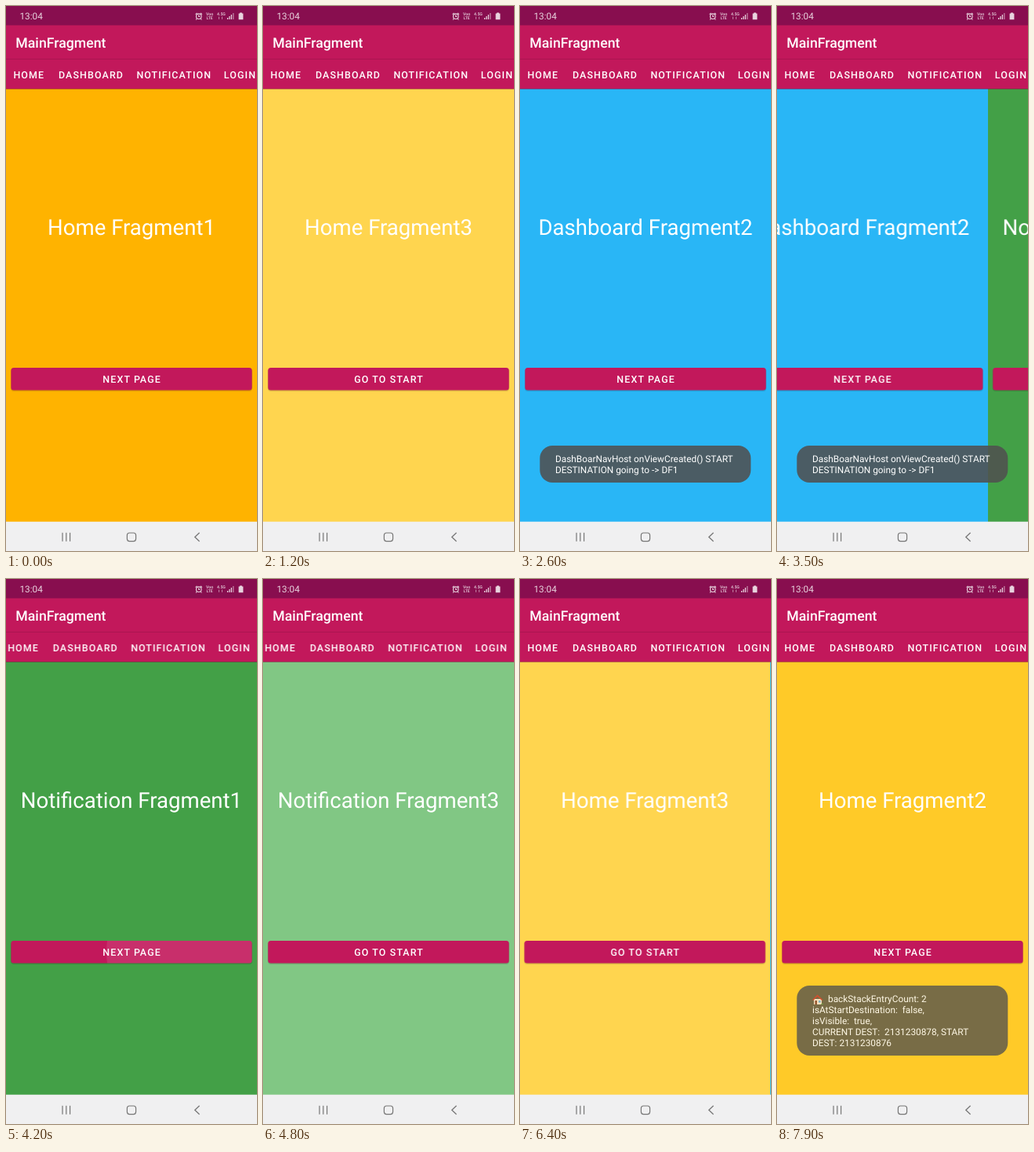
An HTML page for the animation above (8 s loop, 320 by 693 pixels).

```html
<!DOCTYPE html>
<html lang="en">
<head>
<meta charset="utf-8">
<title>Tabs with nested navigation</title>
<style>
html, body { margin: 0; width: 100%; height: 100%; overflow: hidden; background: #f0f0f1; }
svg { display: block; width: 320px; height: 693px; font-family: Roboto, sans-serif; text-rendering: geometricPrecision; }
text { fill: #fff; white-space: pre; }
.caps { font-size: 12.44px; font-weight: 500; letter-spacing: 1.11px; }
.head { font-size: 27.6px; text-anchor: middle; }
.label { text-anchor: middle; }
.toast { font-size: 11.85px; }
.tiny { font-size: 5.2px; font-weight: 500; }
.status text { fill: #e8d3de; }
</style>
</head>
<body>
<svg viewBox="0 0 320 693">
  <defs>
    <clipPath id="face"><rect x="6.4" y="460" width="307.2" height="28.4" rx="3.5"/></clipPath>
  </defs>
  <g id="strip"></g>
  <g clip-path="url(#face)"><circle id="ripple" cx="225" cy="474" r="97" fill="#fff" fill-opacity=".1"/></g>

  <rect width="320" height="105.5" fill="#c2185b"/>
  <rect y="67" width="320" height="1" fill="#000" opacity=".12"/>
  <rect y="105" width="320" height="1" fill="#000" opacity=".18"/>
  <text x="12.3" y="53.2" font-size="17.7" font-weight="500">MainFragment</text>
  <g id="tabs" class="caps"></g>

  <g class="status">
    <rect width="320" height="24.5" fill="#880e4f"/>
    <text x="17.4" y="17.3" font-size="11.8">13:04</text>
    <g fill="none" stroke="#e8d3de" stroke-width="1.1">
      <circle cx="245.8" cy="13.2" r="3.3"/>
      <path d="M245.8 11.2v2.2h1.5M241.6 10.6l2-1.8M250 10.6l-2-1.8M243.2 16.3l-1 1.2M248.4 16.3l1 1.2"/>
    </g>
    <text class="tiny" x="255" y="11.9">Voᴏ</text>
    <text class="tiny" x="255.4" y="17.2">LTE</text>
    <text class="tiny" x="269" y="11.9">4.5G</text>
    <path d="M271.5 13.6v3.2M275.5 13.6v3.2" stroke="#e8d3de" opacity=".6"/>
    <path d="M282.6 17v-2M285 17v-4M287.4 17v-6" stroke="#e8d3de" stroke-width="1.3"/>
    <path d="M289.8 17v-8" stroke="#e8d3de" stroke-width="1.3" opacity=".6"/>
    <path d="M298 8.4h3v1h1.4v7.8h-5.8v-7.8h1.4z" fill="#e8d3de"/>
  </g>

  <rect y="655.7" width="320" height="37.3" fill="#f0f0f1"/>
  <ellipse id="press" cx="243.5" cy="675" rx="30" ry="18" fill="#000" fill-opacity=".08"/>
  <g fill="none" stroke="#777" stroke-width="1.2">
    <path d="M72 669.8v11M76.8 669.8v11M81.6 669.8v11"/>
    <rect x="154.4" y="670" width="11.2" height="10.6" rx="3"/>
    <path d="M246.6 669.8l-5.8 5.5 5.8 5.5" stroke-width="1.3"/>
  </g>
  <g id="toasts" class="toast"></g>
</svg>
<script>
const LOOP = 8000, W = 320;
const $ = id => document.getElementById(id);

function add(parent, tag, attrs = {}, text = '') {
  const el = document.createElementNS('http://www.w3.org/2000/svg', tag);
  for (const k in attrs) el.setAttribute(k, attrs[k]);
  el.textContent = text;
  return parent.appendChild(el);
}

// Loops a table of [ms, value] as held steps.
function play(el, prop, steps) {
  const frames = steps.map(([ms, v]) => ({ offset: ms / LOOP, [prop]: v, easing: 'step-end' }));
  frames.push({ offset: 1, [prop]: steps[steps.length - 1][1] });
  el.animate(frames, { duration: LOOP, iterations: Infinity });
}

const every100 = (start, list) => list.map((v, i) => [start + i * 100, v]);
const shift = x => `translateX(${x}px)`;

// Each page holds three screens; `shown` lists when each screen takes over.
const pages = [
  { name: 'Home', fills: ['#ffb300', '#ffca28', '#ffd54f'], shown: [[0, 0], [600, 1], [1200, 2], [7500, 1]] },
  { name: 'Dashboard', fills: ['#039be5', '#29b6f6', '#4fc3f7'], shown: [[0, 0], [2600, 1]] },
  { name: 'Notification', fills: ['#43a047', '#66bb6a', '#81c784'], shown: [[0, 0], [4300, 1], [4800, 2]] }
];

pages.forEach(({ name, fills, shown }, p) => {
  const page = add($('strip'), 'g', { transform: `translate(${p * W} 0)` });
  fills.forEach((fill, i) => {
    const g = add(page, 'g');
    add(g, 'rect', { y: 105, width: W, height: 551, fill });
    add(g, 'text', { class: 'head', x: 160, y: 291.4 }, `${name} Fragment${i + 1}`);
    add(g, 'rect', { x: 6, y: 461, width: 308, height: 29, rx: 4, fill: '#000', opacity: .14 });
    add(g, 'rect', { x: 6.4, y: 460, width: 307.2, height: 28.4, rx: 3.5, fill: '#c2185b' });
    add(g, 'text', { class: 'caps label', x: 160.6, y: 478.8 }, i < 2 ? 'NEXT PAGE' : 'GO TO START');
    play(g, 'opacity', shown.map(([ms, n]) => [ms, +(n === i)]));
  });
});

[['HOME', 9.4], ['DASHBOARD', 67], ['NOTIFICATION', 166.4], ['LOGIN', 277.8]]
  .forEach(([s, x]) => add($('tabs'), 'text', { x, y: 91.9 }, s));

// Pager position in pages.
const pos = [
  [0, 0],
  ...every100(1700, [.04, .2, .5, .8, .94, .99, 1]),
  ...every100(3400, [1.04, 1.16, 1.42, 1.72, 1.9, 1.97, 1.995, 2]),
  ...every100(5200, [1.9, 1.5, 1.15, 1.015, 1]),
  ...every100(6100, [.88, .42, .07, .0025, 0])
];
const tabShift = v => -Math.min(7.3, Math.max(0, 105 * (v - 1) - 52));
play($('strip'), 'transform', pos.map(([ms, v]) => [ms, shift(-v * W)]));
play($('tabs'), 'transform', pos.map(([ms, v]) => [ms, shift(tabShift(v))]));

play($('ripple'), 'opacity', [[0, 0],
  ...[[500, 600], [1000, 1200], [2500, 2600], [4200, 4300], [4700, 4800]]
    .flatMap(([on, off]) => [[on, 1], [off, 0]])]);
play($('ripple'), 'r', [[0, '97px'], [1000, '45px'], [1100, '97px']]);
play($('press'), 'opacity', [[0, 0], ...every100(7400, [1, .8, .4, .15, 0])]);

function toast(lines, steps) {
  const g = add($('toasts'), 'g'), h = 19 + lines.length * 14, top = 606 - h;
  add(g, 'rect', { x: 25.3, y: top, width: 269, height: h, rx: 16, fill: '#505050', 'fill-opacity': .88 });
  lines.forEach(([s, x = 45], i) => add(g, 'text', { x, y: top + 21.4 + i * 14 }, s));
  play(g, 'opacity', [[0, 0], ...steps]);
  return g;
}

toast([['DashBoarNavHost onViewCreated() START'], ['DESTINATION going to -> DF1']],
  [...every100(2000, [.3, .6, .88, 1]), ...every100(3800, [.75, .4, .12, 0])]);

const info = toast([
  ['backStackEntryCount: 2', 65],
  ['isAtStartDestination:  false,'],
  ['isVisible:  true,'],
  ['CURRENT DEST:  2131230878, START'],
  ['DEST: 2131230876']
], every100(7600, [.15, .4, .67, .88]));

// Small house at the start of the first line.
[['M47 534h10v7H47z', '#f3e3d0'], ['M45 535l6.5-6.5 7 6.5-1.2 1-5.8-5-5.3 5z', '#c8402f'],
 ['M48.4 536h2.6v5h-2.6z', '#8a4b32'], ['M53 536h2.6v2.6H53z', '#6fb3d8'], ['M56 541a1.8 1.8 0 0 1 3.4 0z', '#5f9a45']]
  .forEach(([d, fill]) => add(info, 'path', { d, fill }));
</script>
</body>
</html>
```
